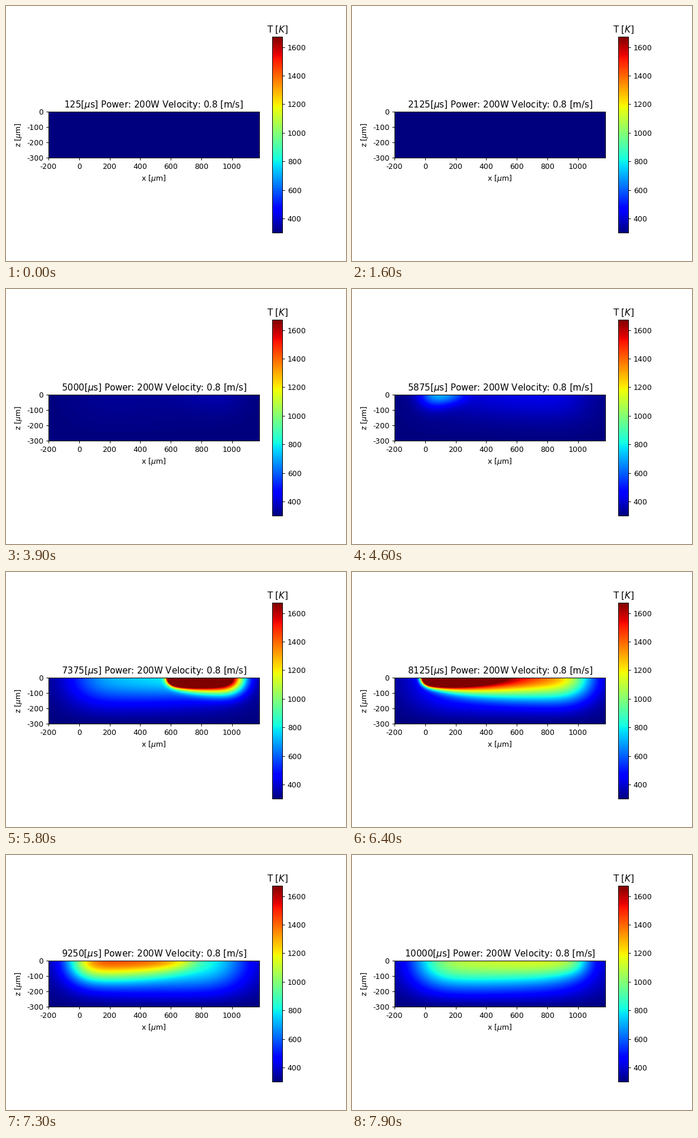
Write a matplotlib script that moves like this. It is 576 by 432 pixels and loops after 8 s.

```python
import numpy as np
import matplotlib.pyplot as plt
from matplotlib.animation import FuncAnimation

plt.rcParams["font.family"] = "DejaVu Sans"
plt.rcParams["axes.unicode_minus"] = False

FRAMES, INTERVAL = 80, 100
STEP = 125                      # simulated microseconds per frame

# Laser scan: back-and-forth tracks, lengths in um, times in us
SPEED, LENGTH, HATCH, START = 0.8, 1000, 100, 10
SCAN = LENGTH / SPEED
CYCLE = SCAN + HATCH / SPEED
PLANE = 5 * HATCH               # y of the section shown
TURN_POWER = 0.7

# Heat spreading
T_COLD, T_MELT = 300, 1673
HEAT, SPREAD, SPOT, DECAY = 1.25e7, 16, 1250, 12000
DEPTH = 300
DT = 6.25

X0, X1, CELL = -200, 1180, 5
x = np.arange(X0 + CELL / 2, X1, CELL)
z = np.arange(-CELL / 2, -DEPTH, -CELL)


def laser(t):
    """Position and relative power of the beam at times t."""
    track, c = np.divmod(t, CYCLE)
    along = np.minimum(c, SCAN) * SPEED
    px = START + np.where(track % 2 == 0, along, LENGTH - along)
    py = track * HATCH + np.maximum(c - SCAN, 0) * SPEED
    return px, py, np.where(c < SCAN, 1, TURN_POWER)


def temperature(t):
    """Sum of spreading heat spots, with a cold floor at z = -DEPTH."""
    tau = np.arange(DT / 2, t, DT)
    px, py, power = laser(tau)
    age = t - tau
    s = (SPOT + SPREAD * age)[:, None]
    amp = HEAT / np.sqrt(np.pi) * SPEED * DT * power * np.exp(-age / DECAY)
    amp = amp[:, None] * np.exp(-(py[:, None] - PLANE) ** 2 / s) / s ** 1.5
    across = np.exp(-(x - px[:, None]) ** 2 / s)
    down = sum((-1) ** n * np.exp(-(z - 2 * n * DEPTH) ** 2 / s)
               for n in (-1, 0, 1))
    return T_COLD + (amp * down).T @ across


fig, ax = plt.subplots(figsize=(6.4, 4.8), dpi=90)
image = ax.imshow(temperature(STEP), cmap="jet", vmin=T_COLD, vmax=T_MELT,
                  extent=(X0, X1, -DEPTH, 0), interpolation="bilinear")
ax.set_xticks(range(-200, 1001, 200))
ax.set_yticks(range(-300, 1, 100))
ax.set_xlabel(r"x [$\mu$m]")
ax.set_ylabel(r"z [$\mu$m]")
title = ax.set_title("")

bar = fig.colorbar(image, ax=ax)
bar.set_ticks(range(400, 1601, 200))
bar.ax.set_title("T [$K$]")


def update(i):
    t = STEP * (i + 1)
    image.set_data(temperature(t))
    title.set_text(rf"{t}[$\mu$s] Power: 200W Velocity: 0.8 [m/s]")
    return image, title


anim = FuncAnimation(fig, update, frames=FRAMES, interval=INTERVAL,
                     repeat=True, repeat_delay=0)
plt.show()
```
